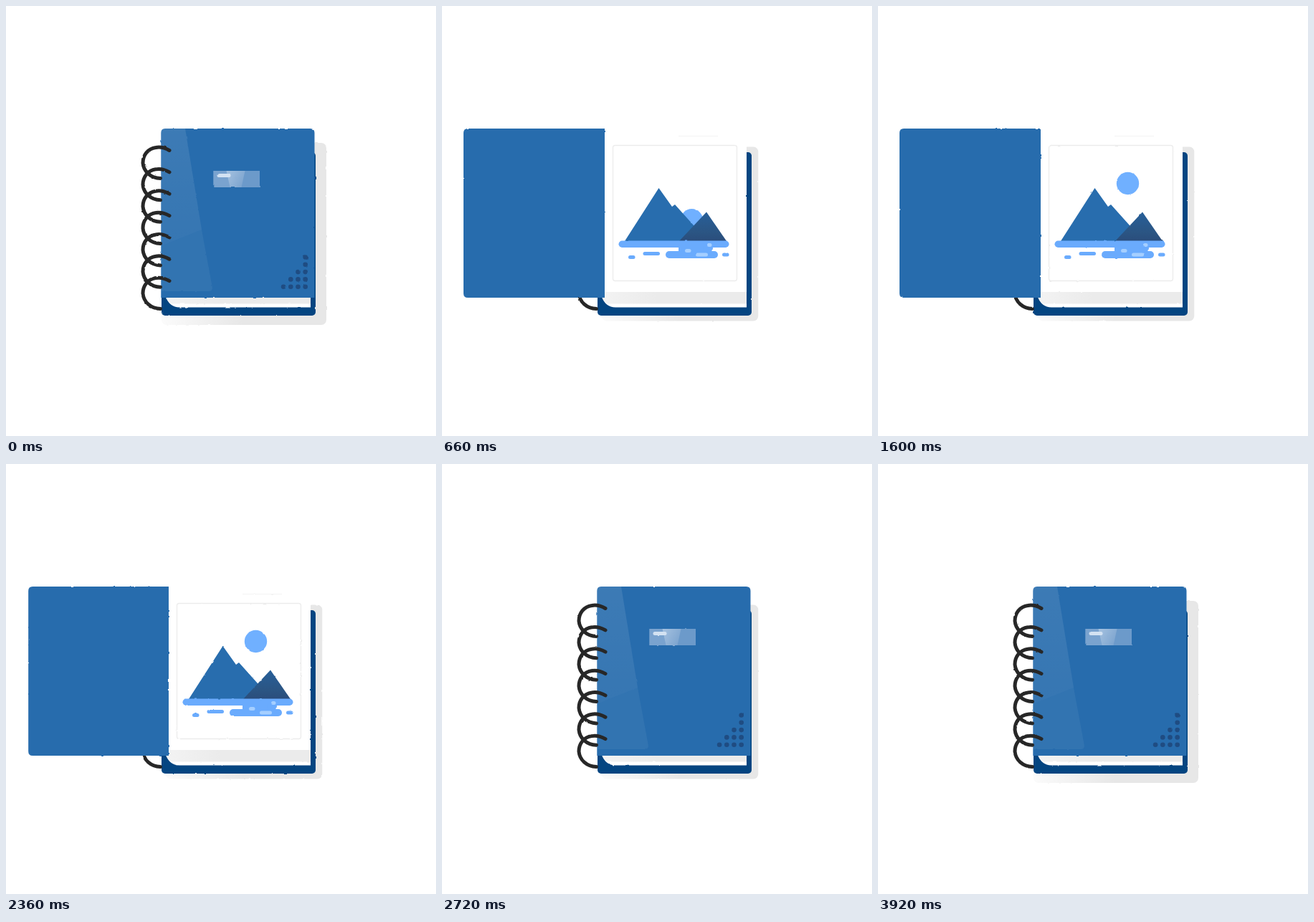
An HTML page for the animation above (3.94 s loop, 600 by 600 pixels).

```html
<!DOCTYPE html>
<html lang="en">
<head>
<meta charset="utf-8">
<title>Sketchbook</title>
<style>
html, body { margin: 0; width: 100%; height: 100%; overflow: hidden; background: #fff; }
svg { display: block; width: 100vw; height: 100vh; }
</style>
</head>
<body>
<svg viewBox="0 0 600 600">
  <defs>
    <filter id="rough" filterUnits="userSpaceOnUse" x="20" y="160" width="440" height="296" color-interpolation-filters="sRGB">
      <feTurbulence id="noiseA" type="fractalNoise" baseFrequency=".16" result="a"/>
      <feTurbulence id="noiseB" type="fractalNoise" baseFrequency=".16" result="b"/>
      <feComposite id="blend" in="a" in2="b" operator="arithmetic" result="n"/>
      <feDisplacementMap in="SourceGraphic" in2="n" scale="2.400" xChannelSelector="R" yChannelSelector="G"/>
    </filter>
    <linearGradient id="shade" gradientUnits="userSpaceOnUse" x1="217" x2="330" y1="0" y2="0">
      <stop stop-color="#fbfbfb"/><stop offset="1" stop-color="#e7e7e7"/>
    </linearGradient>
    <linearGradient id="band" gradientUnits="userSpaceOnUse" x1="222" x2="300" y1="0" y2="0">
      <stop stop-color="#f3f3f3"/><stop offset="1" stop-color="#ebebeb"/>
    </linearGradient>
    <linearGradient id="peak" x2="0" y2="1">
      <stop stop-color="#275f99"/><stop offset=".7" stop-color="#2b5583"/><stop offset="1" stop-color="#2a4d7c"/>
    </linearGradient>
    <linearGradient id="glass" x2="1" y2=".5">
      <stop stop-color="#a6c2e0"/><stop offset="1" stop-color="#7fa6d0"/>
    </linearGradient>
    <linearGradient id="sheen" x2="0" y2="1">
      <stop stop-color="#fff" stop-opacity=".1"/><stop offset="1" stop-color="#fff" stop-opacity=".07"/>
    </linearGradient>
    <clipPath id="edge"><path id="edgePath"/></clipPath>
    <clipPath id="behind"><rect x="180" y="190" width="46" height="250"/></clipPath>
  </defs>

  <g filter="url(#rough)">
    <rect id="shadow" x="217" y="191" width="230" height="254" rx="7" fill="url(#shade)"/>
    <rect x="217" y="204" width="215" height="228" rx="5" fill="#044581"/>

    <!-- page -->
    <path d="M217 181H425V420.500H242Q228 420 223 406H217Z" fill="#fff"/>
    <path d="M217 399H425V415.500H230Q225 411 223 406H217Z" fill="url(#band)"/>
    <path d="M330 181.500H385" stroke="#f3f3f3"/>
    <rect x="238.500" y="194.500" width="173" height="189" rx="3" fill="none" stroke="#ececec" stroke-width="1.300"/>

    <!-- landscape -->
    <circle id="sun" cx="348.500" r="15.700" fill="#70b0ff"/>
    <path d="M255 328L302.500 254L321 280L325 277L351 306L370 328Z" fill="#286dae"/>
    <path d="M331 328L369 287.500L397 328Z" fill="url(#peak)"/>
    <g id="water" fill="#6aabfd">
      <path d="M330 335H378Q374 339 378 344H330Z"/>
    </g>

    <!-- front cover -->
    <g id="front" clip-path="url(#edge)">
      <rect x="210" y="165" width="230" height="250" fill="#276cad"/>
      <path id="sheenTop" fill="url(#sheen)"/>
      <path id="sheenLow" fill="#fff" fill-opacity=".05"/>
      <g id="label">
        <rect id="plate" height="23" fill="#6c9aca"/>
        <g id="gloss">
          <path d="M0 0H18L23 23H0Z" fill="#7aa3cf"/>
          <path d="M18 0H44L39 23H23Z" fill="url(#glass)"/>
          <rect x="5" y="4" width="19" height="5" rx="2.500" fill="#d3e2f2"/>
        </g>
      </g>
      <g id="dots" fill="#1f4c82"></g>
    </g>
    <g id="rings" fill="none" stroke="#272727" stroke-width="5" stroke-linecap="round"></g>
    <path id="back" fill="#276cad"/>
  </g>
</svg>
<script>
const LOOP = 3940, SEEDS = 20, CLOSED = 430.5, OPEN = 30, HINGE = 227;
const $ = id => document.getElementById(id);
const set = (el, attrs) => { for (const k in attrs) el.setAttribute(k, attrs[k]); };
const add = (parent, tag, attrs) => {
  const el = document.createElementNS('http://www.w3.org/2000/svg', tag);
  set(el, attrs);
  parent.append(el);
};
const ease = (t, start, end) => {
  const u = Math.min(1, Math.max(0, (t - start) / (end - start)));
  return u < .5 ? 4 * u ** 3 : 1 - 4 * (1 - u) ** 3;
};

for (let i = 0; i < 7; i++) {
  add($('rings'), 'path', {
    d: 'M228 201.500C221 197.500 214 196.500 209 197.500C198 199 191 208 191 219C192 231 202 240 215.500 240.500',
    transform: `translate(0 ${i * 30.35})`
  });
}

[1, 1, 2, 3, 4].forEach((count, row) => {
  for (let i = 0; i < count; i++) {
    add($('dots'), 'circle', { cx: 417.7 - i * 10.2, cy: 350.5 + row * 10.3, r: 3.3 });
  }
});

// Rounded bars: x, y, width, height, highlight
for (const [x, y, width, height, light] of [
  [246.5, 327.5, 154, 9.5], [312, 342, 73, 10], [364, 335, 14, 6],
  [260, 348, 9.5, 5], [280.5, 343, 23.5, 5], [391, 344.5, 9.5, 5],
  [339, 339, 8.5, 5, 1], [354, 344.5, 17, 5, 1], [370, 331, 6.5, 5, 1]
]) {
  add($('water'), 'rect', { x, y, width, height, rx: height / 2, ...(light && { fill: '#a5cfff' }) });
}

function drawCover(x) {
  const d = CLOSED - x, r = Math.max(0, 6 - d / 5), isFront = x > HINGE;
  $('front').style.display = isFront ? '' : 'none';
  $('back').style.display = isFront ? 'none' : '';
  set($('rings'), { 'clip-path': isFront ? 'none' : 'url(#behind)' });
  if (!isFront) {
    set($('back'), { d: `M${HINGE} 171H${x + 6}Q${x} 171 ${x} 177V401Q${x} 407 ${x + 6} 407H${HINGE}Z` });
    return;
  }
  set($('edgePath'), {
    d: `M222 171H${x - r}Q${x} 171 ${x} ${171 + r}V407H216.300V177Q216.300 171 222 171Z`
  });
  const foot = 288 - d * .04, mid = 273 - d * .025;
  set($('sheenTop'), { d: `M216 171H250L${mid} 312L216 335Z` });
  set($('sheenLow'), { d: `M216 335L${mid} 312L${foot} 393Q${foot} 398 ${foot - 5} 398H216Z` });

  // The gloss shrinks half as fast as its plate
  const fold = Math.max(0, d - 54), squeeze = Math.max(0, 1 - fold * .01);
  set($('label'), { transform: `translate(${289.5 - fold * .1} 230)` });
  set($('plate'), { width: 64.5 * squeeze });
  set($('gloss'), { transform: `scale(${(1 + squeeze) / 2} 1)` });
  set($('dots'), { transform: `translate(${-d / 2} 0)` });
}

function draw(t) {
  const swing = ease(t, 288, 621) - ease(t, 2331, 2664);
  drawCover(CLOSED + (OPEN - CLOSED) * swing);

  const lift = ease(t, 160, 400) - ease(t, 2720, 2960);
  set($('shadow'), { transform: `translate(332 318) scale(${1 - .05 * lift} ${1 - .044 * lift}) translate(-332 -318)` });
  set($('sun'), { cy: 300 - 52.5 * ease(t, 500, 1400) });

  // Edges wobble by fading from one noise seed to the next
  const phase = t / LOOP * SEEDS, n = Math.floor(phase), f = phase - n;
  set($('noiseA'), { seed: n + 1 });
  set($('noiseB'), { seed: (n + 1) % SEEDS + 1 });
  set($('blend'), { k2: 1 - f, k3: f });
}

const start = performance.now();
function tick() {
  draw((performance.now() - start) % LOOP);
  requestAnimationFrame(tick);
}
tick();
</script>
</body>
</html>
```
